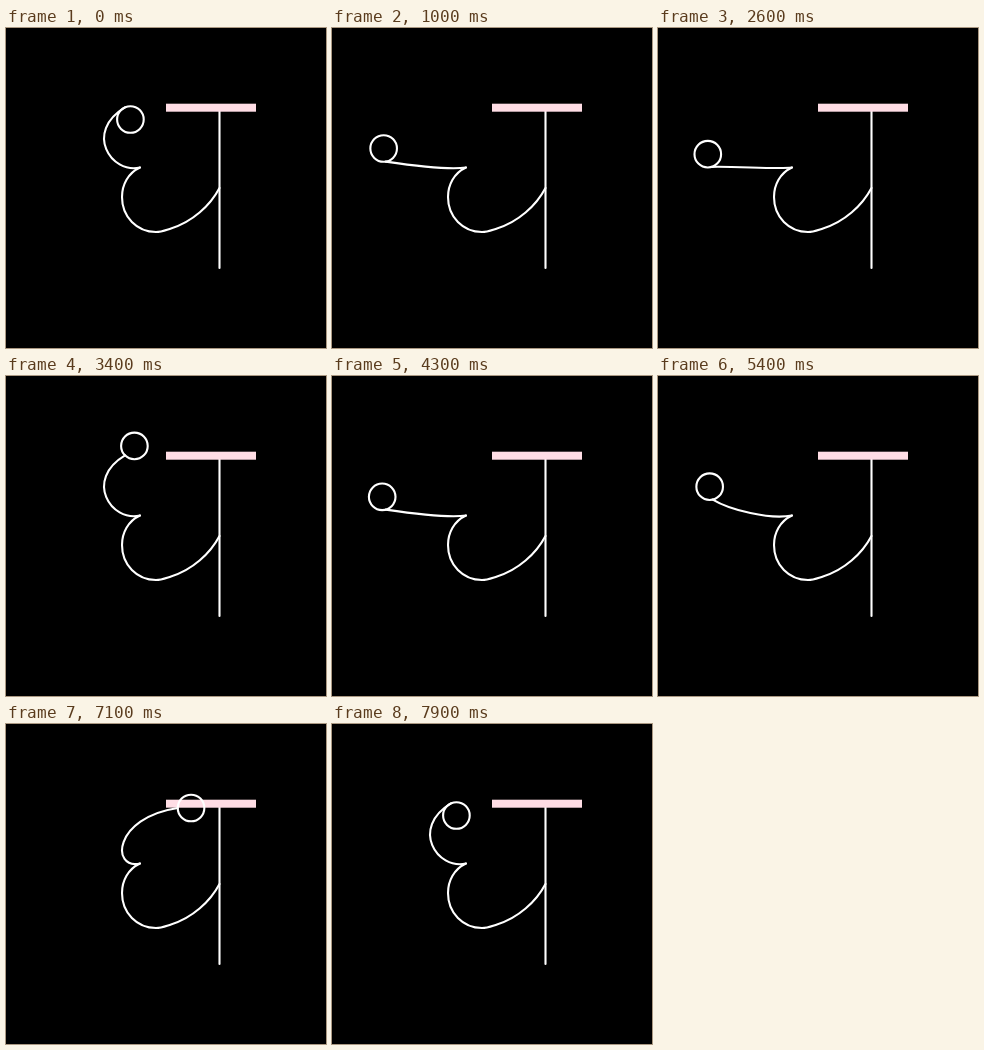
Write an HTML page that moves like this. It is 320 by 320 pixels and loops after 9 s.

```html
<!DOCTYPE html>
<html>
<head>
<meta charset="utf-8">
<style>
html, body { margin: 0; height: 100%; overflow: hidden; background: #000; }
svg { display: block; width: 100vw; height: 100vh; }
</style>
</head>
<body>
<svg viewBox="0 0 320 320" fill="none" stroke="#fff" stroke-width="2.1" stroke-linecap="round" stroke-linejoin="round">
  <path d="M213.5 83V240"/>
  <path d="M134 139.5C122 145 116 157 116 169C116 189 131 204 150 204C155 204 160 202 165 200.5C186 194 204 178 213.5 160"/>
  <rect x="160" y="75.7" width="90" height="8" fill="#ffdde5" stroke="none"/>
  <path id="arm"/>
  <circle id="ring" r="13.3"/>
</svg>
<script>
const arm = document.getElementById('arm');
const ring = document.getElementById('ring');
const LOOP = 9000, STEP = 100, START = 400, SWING = 1500, FLING = 6400, SETTLE = 7300, END = 7900;
const base = { x: 134, y: 139.5 };
const rad = Math.PI / 180;
const mix = (a, b, k) => a + (b - a) * k;

// ring angle around the arm's tip while the arm is closed: [time, degrees]
const turns = [[START, 33], [1900, 14], [3400, -45], [4900, -75], [FLING, -90], [SETTLE, -32], [END, 66]];

function turnAt(t) {
  if (t < START || t >= END) return 66;
  const i = turns.findIndex(k => k[0] > t);
  const [t0, a] = turns[i - 1], [t1, b] = turns[i];
  return mix(a, b, (t - t0) / (t1 - t0));
}

function draw(t) {
  // open: swing to the left, over: final swing to the right
  const open = t > START && t < FLING ? Math.abs(Math.sin(Math.PI * (t - START) / SWING)) : 0;
  const over = t > FLING && t < SETTLE ? Math.sin(Math.PI * (t - FLING) / (SETTLE - FLING)) : 0;

  const lean = (14 + 66 * open + 10 * open ** 2 - 75 * over) * rad;
  const reach = 62 + 46 * open - 28 * open ** 2 + 8 * over;
  const x = base.x - reach * Math.sin(lean);
  const y = base.y - reach * Math.cos(lean);

  const flat = open ** 6;
  const c1 = [105 + 16 * flat, 146 - 5 * flat];
  const c2 = [78 - 15 * open + 16 * flat + 45 * over, 104 + 34.5 * open - 16 * over];
  arm.setAttribute('d', `M${base.x} ${base.y}C${c1} ${c2} ${x} ${y}`);

  const turn = (mix(turnAt(t), -109, open ** 1.5) + 70 * over) * rad;
  ring.setAttribute('cx', x + 13.3 * Math.cos(turn));
  ring.setAttribute('cy', y + 13.3 * Math.sin(turn));
}

const began = performance.now();
function tick() {
  const t = (performance.now() - began) % LOOP;
  draw(Math.floor(t / STEP) * STEP);
  requestAnimationFrame(tick);
}
tick();
</script>
</body>
</html>
```
